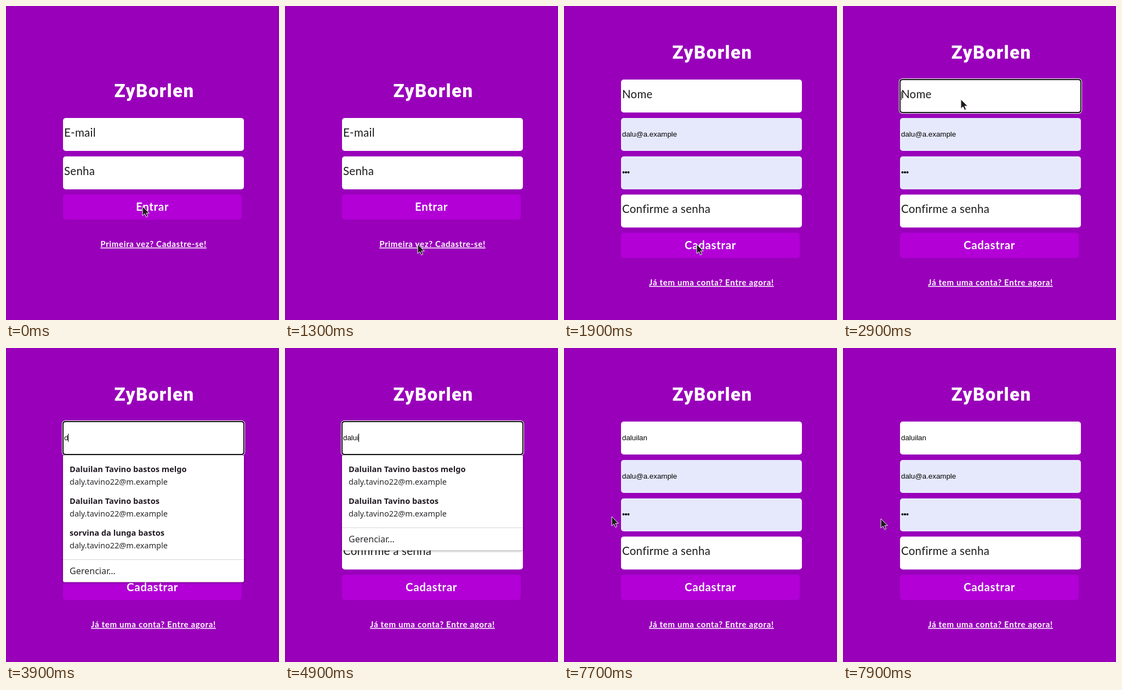
Animation, 498 px wide and 572 px high, one loop 8000 ms. Source, as an HTML page:

```html
<!DOCTYPE html>
<html lang="pt-BR">
<head>
<meta charset="utf-8">
<title>Cadastro</title>
<style>
  html, body { margin: 0; width: 100%; height: 100%; overflow: hidden; background: #9900ba; }
  svg { display: block; }
  .logo { font: 900 33px Roboto, sans-serif; letter-spacing: 1.4px; fill: #fff; text-anchor: middle; }
  .hint { font: 400 20.5px Lato, sans-serif; letter-spacing: .25px; fill: #1a1a1a; }
  .label { font: 700 20.5px Lato, sans-serif; letter-spacing: .65px; fill: #fff; text-anchor: middle; }
  .link { font: 700 15px Lato, sans-serif; letter-spacing: .67px; fill: #fff; text-anchor: middle; text-decoration: underline; }
  .value { font: 400 13.333px "Liberation Sans", Arial, sans-serif; fill: #000; }
  .name { font: 600 14.6px "Noto Sans", sans-serif; fill: #211a22; }
  .mail { font: 400 14.5px "Noto Sans", sans-serif; fill: #2b272c; }
  .manage { font: 400 16.1px "Noto Sans", sans-serif; fill: #2b272c; }
  .menu { filter: drop-shadow(0 1px 2px rgba(0, 0, 0, .4)); }
</style>
</head>
<body>
<svg id="stage" width="498" height="572" viewBox="0 0 498 572"></svg>
<script>
const LOOP = 8000, STEP = 100;
const NAME = "daluilan";
const PEOPLE = ["Daluilan Tavino bastos melgo", "Daluilan Tavino bastos", "sorvina da lunga bastos"];
const stage = document.getElementById("stage");

function add(parent, tag, attrs, text) {
  const el = document.createElementNS("http://www.w3.org/2000/svg", tag);
  for (const key in attrs) el.setAttribute(key, attrs[key]);
  if (text) el.textContent = text;
  parent.appendChild(el);
  return el;
}
const group = (parent, cls = "") => add(parent, "g", { class: cls });
const box = (parent, x, y, width, height, rx, fill) =>
  add(parent, "rect", { x, y, width, height, rx, fill });
const write = (parent, cls, x, y, text) => add(parent, "text", { class: cls, x, y }, text);
const show = (el, on) => { el.style.display = on ? "" : "none"; };

function field(parent, y, hint, fill = "#fff") {
  box(parent, 104, y, 330, 60, 5, fill);
  if (hint) write(parent, "hint", 106, y + 34, hint);
}

function frame(parent, logoY, buttonY, label, link) {
  write(parent, "logo", 270.5, logoY, "ZyBorlen");
  box(parent, 104, buttonY, 326, 46, 5, "#b200d6");
  write(parent, "label", 267, buttonY + 30, label);
  write(parent, "link", 269, buttonY + 96, link);
}

box(stage, 0, 0, 498, 572, 0, "#9900ba");

const login = group(stage);
frame(login, 166, 343, "Entrar", "Primeira vez? Cadastre-se!");
field(login, 204, "E-mail");
field(login, 274, "Senha");

const signup = group(stage);
frame(signup, 96, 413, "Cadastrar", "Já tem uma conta? Entre agora!");
field(signup, 134);
const ring = group(signup);
box(ring, 102, 132, 334, 64, 6, "#fff");
box(ring, 103, 133, 332, 62, 5, "#101010");
box(ring, 105, 135, 328, 58, 4, "#fff");
const nameHint = write(signup, "hint", 106, 168, "Nome");
const typed = write(signup, "value", 106, 168);
const caret = box(signup, 106, 156, 1, 15, 0, "#000");
field(signup, 343.4, "Confirme a senha");

const empty = group(signup);
field(empty, 204, "E-mail");
field(empty, 274, "Senha");
const filled = group(signup);
field(filled, 204, "", "#e6e9fc");
field(filled, 274, "", "#e6e9fc");
write(filled, "value", 106, 238, "dalu@a.example");
for (const cx of [108.5, 113, 117.5]) add(filled, "circle", { cx, cy: 303, r: 2 });

function makeMenu(count) {
  const menu = group(stage, "menu"), end = 252 + count * 58;
  add(menu, "path", { fill: "#fff", d: `M104 196H434V${end - 2.5}q0 3-3 3H107q-3 0-3-3Z` });
  PEOPLE.slice(0, count).forEach((person, i) => {
    write(menu, "name", 116, 225.5 + i * 58, person);
    write(menu, "mail", 116, 249 + i * 58, "daly.tavino22@m.example");
  });
  box(menu, 104, end - 41, 330, 1, 0, "#d6d6d9");
  write(menu, "manage", 116, end - 14, "Gerenciar…");
  return menu;
}
const longMenu = makeMenu(3), shortMenu = makeMenu(2);

const bubble = box(stage, 0, 552, 53, 20, 0, "#f1f3f4");
const cursor = add(stage, "path", {
  d: "M0 0V17L4 13.4L6.8 19.6L9.6 18.4L7 12.3H12.3Z",
  fill: "#1c1c1c", stroke: "#f4e8f6", "stroke-width": 1, "stroke-linejoin": "round"
});

// time, x, y of the pointer tip
const PATH = [
  [0, 249, 365], [400, 249, 365], [600, 243, 388], [800, 237, 424], [900, 240, 432],
  [1200, 240, 432], [1300, 242, 434], [1900, 242, 434], [2400, 240, 420], [2500, 240, 420],
  [2700, 224, 280], [2900, 215, 170], [3100, 215, 168], [3400, 206, 161],
  [6800, 488, 58], [6900, 487, 52], [7000, 485, 53], [7100, 485, 53], [7200, 400, 80],
  [7300, 182, 264], [7400, 182, 264], [7600, 96, 305], [7900, 69, 311], [8000, 69, 311]
];
// moments at which the typed text reaches a given length
const KEYS = [[3900, 1], [4200, 2], [4300, 3], [4600, 4], [4800, 5], [5100, 7], [5200, 8]];

function pointer(t) {
  const i = PATH.findIndex(p => p[0] > t);
  const [t0, x0, y0] = PATH[i - 1], [t1, x1, y1] = PATH[i];
  const k = (t - t0) / (t1 - t0);
  return [x0 + (x1 - x0) * k, y0 + (y1 - y0) * k];
}

function draw(now) {
  const t = Math.floor(now % LOOP / STEP) * STEP;
  const within = (a, b) => t >= a && t < b;
  const second = t >= 1400;

  show(login, !second);
  show(signup, second);
  show(empty, t < 1900);
  show(filled, t >= 1900);
  show(ring, within(2900, 7600));

  const count = KEYS.reduce((n, [at, len]) => t >= at ? len : n, 0);
  typed.textContent = NAME.slice(0, count);
  show(nameHint, !count);
  show(caret, within(2900, 3500) || within(3900, 5800) || within(6500, 7000));
  caret.setAttribute("x", 106 + Math.round(count ? typed.getComputedTextLength() : 0));

  show(longMenu, within(3000, 4200));
  show(shortMenu, within(4300, 4800) || within(4900, 7600));

  show(bubble, within(1400, 1700));
  bubble.setAttribute("opacity", t < 1600 ? 1 : .5);

  show(cursor, t < 3500 || t >= 6900);
  cursor.setAttribute("transform", `translate(${pointer(t)})`);
}

const start = performance.now();
function tick() {
  draw(performance.now() - start);
  requestAnimationFrame(tick);
}
draw(0);
requestAnimationFrame(tick);
</script>
</body>
</html>
```
